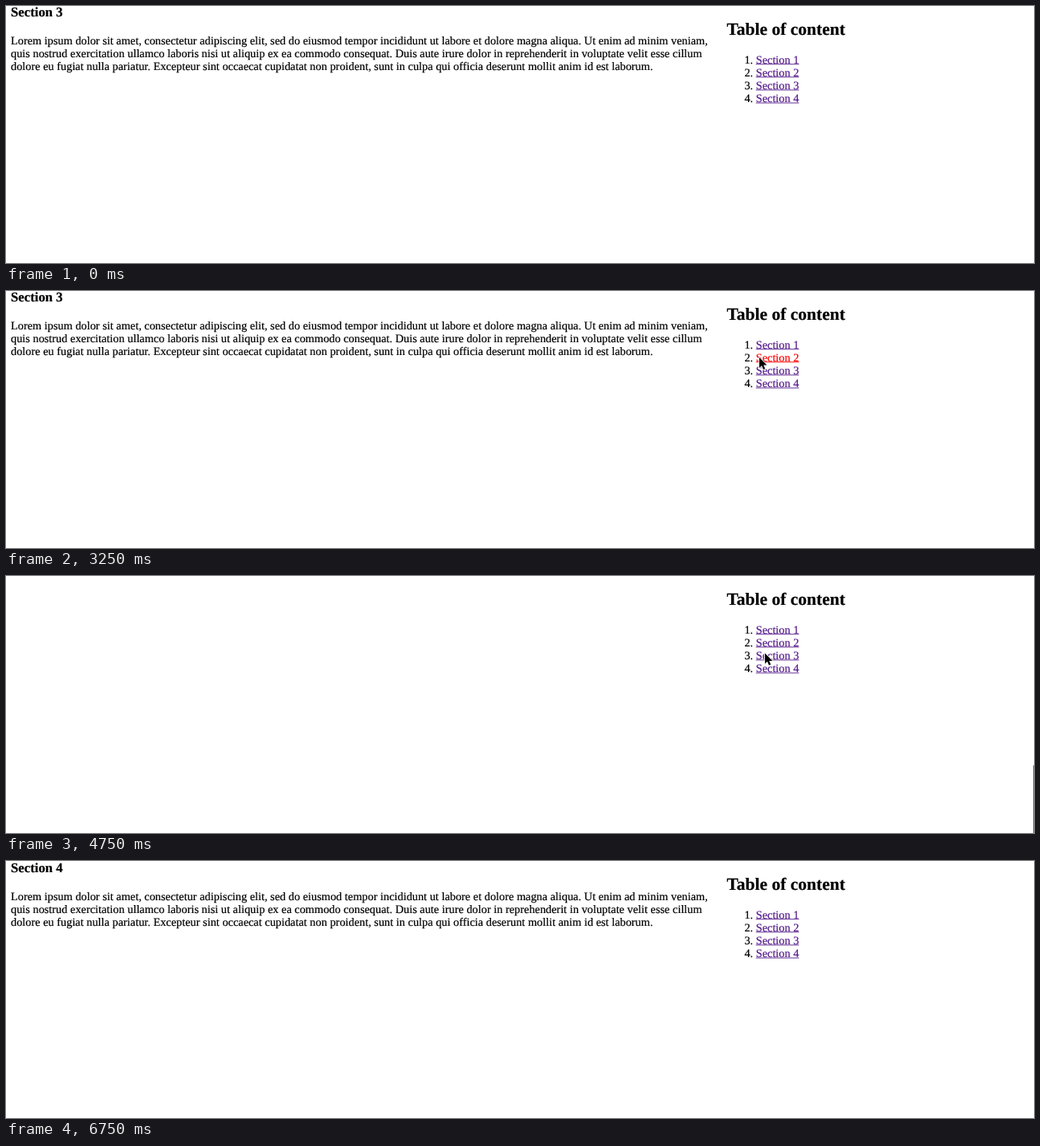
An HTML page that plays this animation: 1280x321 px, repeating every 7000 ms.

```html
<!DOCTYPE html>
<html lang="en">
<head>
<meta charset="utf-8">
<title>Table of content</title>
<style>
  html, body { margin: 0; width: 100%; height: 100%; overflow: hidden; background: #fff; }
  svg { display: block; width: 1280px; height: 321px; }
  text {
    font: 14.33px "Liberation Serif", Times, serif;
    text-rendering: geometricPrecision;
    white-space: pre;
    stroke-width: .2px;
  }
  .h2 { font-size: 21.5px; font-weight: bold; }
  .h3 { font-size: 16.77px; font-weight: bold; }
  #page, #toc { fill: #000; stroke: #000; }
  .link { fill: #551a8b; stroke: #551a8b; }
  .link.active { fill: #f00; stroke: #f00; }
  .link rect { stroke: none; }
  #thumb { fill: #6b6b6b; }
  #cursor {
    stroke: #fff; stroke-width: 1.6; stroke-linejoin: round; paint-order: stroke;
    filter: drop-shadow(0 .7px .6px rgba(0, 0, 0, .3));
  }
</style>
</head>
<body>
<svg viewBox="0 0 1280 321">
  <g id="page"></g>
  <g id="toc"></g>
  <rect id="thumb" x="1279" width="6" height="181" rx="1"/>
  <path id="cursor" d="M0 0V13.1L3 10.3 5 15 7.2 14.1 5.2 9.5H9.4Z"/>
</svg>
<script>
const LOOP = 7000, STEP = 250;
const SECTION = 736, LINE = 16.1, MAX_SCROLL = 3 * SECTION - 1;
const PRESS = 100, GLIDE = 485, THUMB_LIFE = 1000;

const LOREM = [
  'Lorem ipsum dolor sit amet, consectetur adipiscing elit, sed do eiusmod tempor incididunt ut labore et dolore magna aliqua. Ut enim ad minim veniam,',
  'quis nostrud exercitation ullamco laboris nisi ut aliquip ex ea commodo consequat. Duis aute irure dolor in reprehenderit in voluptate velit esse cillum',
  'dolore eu fugiat nulla pariatur. Excepteur sint occaecat cupidatat non proident, sunt in culpa qui officia deserunt mollit anim id est laborum.'
];

// When each link is released, and the section it scrolls to
const CLICKS = [{ time: 3313, to: 2 }, { time: 4571, to: 3 }, { time: 5898, to: 4 }];

// Pointer path: time, x, y
const PATH = [
  [250, 929, 19.5], [750, 931, 20.3], [1000, 944, 39.5], [1500, 946.7, 49],
  [1750, 949.5, 65], [2000, 927, 67], [2250, 848, 68], [2500, 923, 71],
  [2750, 938, 83], [3500, 938, 83], [4000, 945, 94], [5250, 945, 98],
  [5500, 943, 112], [6250, 943, 114.5], [6500, 896, 15]
];

const byId = id => document.getElementById(id);
const page = byId('page'), toc = byId('toc'), thumb = byId('thumb'), cursor = byId('cursor');
const mix = (a, b, k) => a + (b - a) * k;
const sectionTop = n => Math.min((n - 1) * SECTION, MAX_SCROLL);

function add(parent, tag, attrs, label) {
  const el = document.createElementNS('http://www.w3.org/2000/svg', tag);
  for (const key in attrs) el.setAttribute(key, attrs[key]);
  if (label) el.textContent = label;
  return parent.appendChild(el);
}

add(toc, 'text', { x: 897.5, y: 36, class: 'h2' }, 'Table of content');
const links = [1, 2, 3, 4].map(n => {
  const top = (n - 1) * SECTION, y = 71.5 + (n - 1) * LINE, name = 'Section ' + n;

  add(page, 'text', { x: 6, y: top + 13.2, class: 'h3' }, name);
  LOREM.forEach((line, i) => add(page, 'text', { x: 6, y: top + 47.5 + i * LINE }, line));

  add(toc, 'text', { x: 919.4, y }, n + '.');
  const link = add(toc, 'g', { class: 'link' });
  add(link, 'text', { x: 933.7, y }, name);
  add(link, 'rect', { x: 933.7, y: y + .8, width: 53.7, height: .9 });
  return link;
});

// cubic-bezier(.42, 0, .58, 1), solved by bisection
function easeInOut(u) {
  let low = 0, high = 1, s = .5;
  for (let i = 0; i < 20; i++) {
    const x = 1.26 * s * (1 - s) ** 2 + 1.74 * s * s * (1 - s) + s ** 3;
    if (x < u) low = s; else high = s;
    s = (low + high) / 2;
  }
  return s * s * (3 - 2 * s);
}

function scrollAt(t) {
  return CLICKS.reduce((pos, { time, to }) => {
    const u = Math.min(Math.max((t - time) / GLIDE, 0), 1);
    return u ? mix(pos, sectionTop(to), easeInOut(u)) : pos;
  }, sectionTop(3));
}

function pointerAt(t) {
  const i = PATH.findIndex(point => point[0] >= t);
  if (i < 0 || t < PATH[0][0]) return null;
  const [t1, x1, y1] = PATH[i], [t0, x0, y0] = PATH[Math.max(i - 1, 0)];
  const k = t1 > t0 ? (t - t0) / (t1 - t0) : 1;
  return [mix(x0, x1, k), mix(y0, y1, k)];
}

function draw(now) {
  const t = Math.floor(now % LOOP / STEP) * STEP;
  const scroll = scrollAt(t), pointer = pointerAt(t);
  const pressed = CLICKS.find(({ time }) => t < time && time - t < PRESS);
  const scrolling = CLICKS.some(({ time }) => t > time && t - time < THUMB_LIFE);

  page.setAttribute('transform', `translate(0 ${-scroll})`);
  links.forEach((link, i) => link.classList.toggle('active', pressed?.to === i + 1));
  thumb.setAttribute('y', scroll / 4);
  thumb.style.display = scrolling ? '' : 'none';
  cursor.style.display = pointer ? '' : 'none';
  if (pointer) cursor.setAttribute('transform', `translate(${pointer})`);
}

function tick() {
  draw(performance.now());
  requestAnimationFrame(tick);
}
tick();
</script>
</body>
</html>
```
